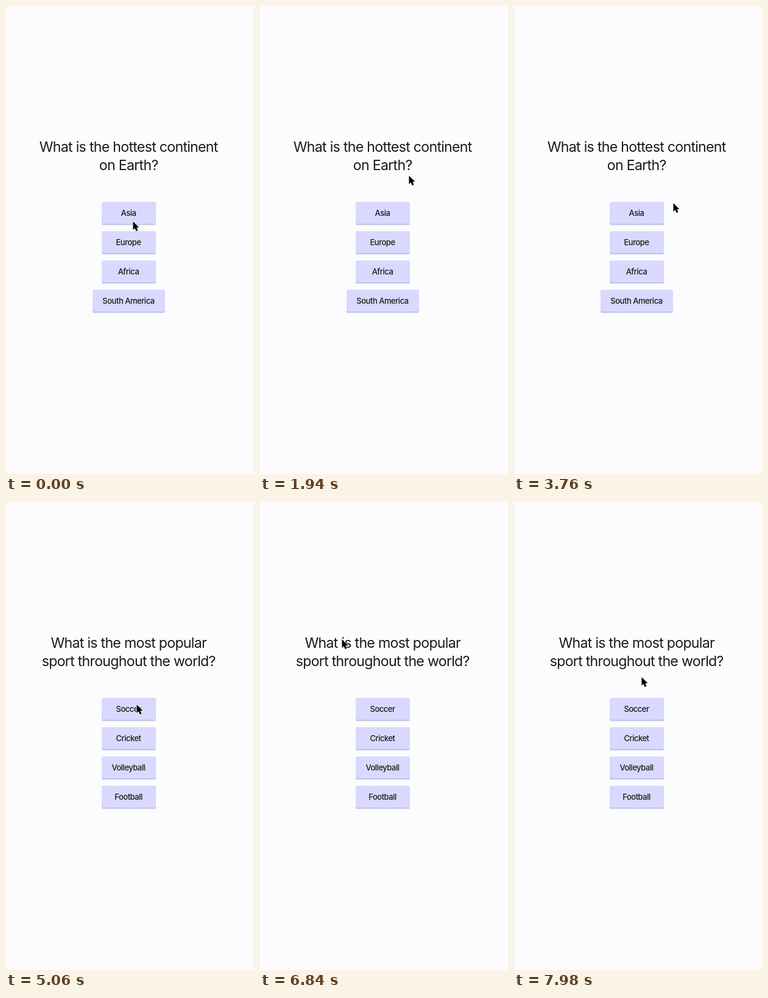
Animation, 407 px wide and 767 px high, one loop 8000 ms. Source, as an HTML page:

```html
<!DOCTYPE html>
<html lang="en">
<head>
<meta charset="utf-8">
<title>Quiz</title>
<style>
  html, body { margin: 0; width: 100%; height: 100%; overflow: hidden; background: #fcfcff; }
  svg { display: block; width: 407px; height: 767px; }
  text {
    font-family: Inter, Roboto, "Liberation Sans", sans-serif;
    font-optical-sizing: none;
    text-anchor: middle;
    fill: #1b1b12;
  }
  .title { font-size: 23.2px; letter-spacing: -0.74px; }
  .label { font-size: 13px; font-weight: 500; letter-spacing: -0.48px; }
</style>
</head>
<body>
<svg id="stage" viewBox="0 0 407 767">
  <g id="pages"></g>
  <path id="cursor" d="M0 0v14l3-3 2 5 3-1-2-5h4z" stroke="#fff" stroke-width="1.6" stroke-linejoin="round" paint-order="stroke"/>
</svg>
<script>
const LOOP = 8000, SWITCH = 5060, STEP = 45;

const quiz = [
  { title: ['What is the hottest continent', 'on Earth?'],
    answers: ['Asia', 'Europe', 'Africa', 'South America'] },
  { title: ['What is the most popular', 'sport throughout the world?'],
    answers: ['Soccer', 'Cricket', 'Volleyball', 'Football'] }
];

// Start ms, end ms, points passed at even intervals; each move begins where the last ended
const moves = [
  [20, 580, '190,290 207,225 231,280 211,327'],
  [1240, 1980, '221,303 247,275'],
  [2080, 2820, '224,225 190,290 217,340 253,290 260,277'],
  [2920, 3660, '236,237 190,283 228,316 272,300 262,321'],
  [3760, 4320, '258,331 236,333 214,332'],
  [5160, 5860, '252,345 298,352'],
  [5880, 6600, '311,376 250,388 120,310 127,238'],
  [6700, 7440, '135,225 149,228 166,237 183,247'],
  [7540, 7980, '195,265 209,287']
];

let last = [208, 353];
const tracks = moves.map(([start, end, path]) => {
  const points = [last, ...path.split(' ').map(p => p.split(',').map(Number))];
  last = points[points.length - 1];
  return { start, end, points, steps: Math.round((end - start) / STEP) + 1 };
});

const el = (parent, tag, attrs, content = '') => {
  const node = document.createElementNS('http://www.w3.org/2000/svg', tag);
  for (const name in attrs) node.setAttribute(name, attrs[name]);
  node.textContent = content;
  return parent.appendChild(node);
};

function button(page, label, y) {
  const wide = label.length > 12;
  const x = wide ? 142 : 157, width = wide ? 119 : 89;
  const box = (dy, fill) => el(page, 'rect', { x, y: y + dy, width, height: 36, rx: 2, fill });
  box(2.4, '#e6e4f8');
  box(1.2, '#b9b4dc');
  box(0, '#d9d9ff');
  el(page, 'text', { class: 'label', x: 201, y: y + 22.6 }, label);
}

const pages = quiz.map(({ title, answers }) => {
  const page = el(document.getElementById('pages'), 'g', {});
  title.forEach((line, i) => el(page, 'text', { class: 'title', x: 201.2, y: 239 + i * 30 }, line));
  answers.forEach((label, i) => button(page, label, 321 + i * 48));
  return page;
});

// Smooth curve through evenly timed points
function along(points, u) {
  const n = points.length - 1;
  const i = Math.min(Math.floor(u * n), n - 1);
  const s = u * n - i, s2 = s * s, s3 = s2 * s;
  const slope = (k, axis) => {
    const lo = Math.max(k - 1, 0), hi = Math.min(k + 1, n);
    return (points[hi][axis] - points[lo][axis]) / (hi - lo);
  };
  return [0, 1].map(axis => {
    const a = points[i][axis], b = points[i + 1][axis];
    return a + (b - a) * (3 * s2 - 2 * s3) +
      slope(i, axis) * (s3 - 2 * s2 + s) + slope(i + 1, axis) * (s3 - s2);
  });
}

function cursorAt(t) {
  const track = tracks.filter(m => t >= m.start).pop();
  if (!track) return tracks[0].points[0];
  const { start, end, steps, points } = track;
  const step = Math.floor((t - start) / (end - start) * (steps - 1) + 0.01) + 1;
  return along(points, Math.min(step / steps, 1));
}

const cursor = document.getElementById('cursor');
function draw(t) {
  pages[0].style.display = t < SWITCH ? '' : 'none';
  pages[1].style.display = t < SWITCH ? 'none' : '';
  const [x, y] = cursorAt(t).map(Math.round);
  cursor.setAttribute('transform', `translate(${x + 0.5} ${y})`);
}

const origin = performance.now();
function tick() {
  draw((performance.now() - origin) % LOOP);
  requestAnimationFrame(tick);
}
tick();
</script>
</body>
</html>
```
